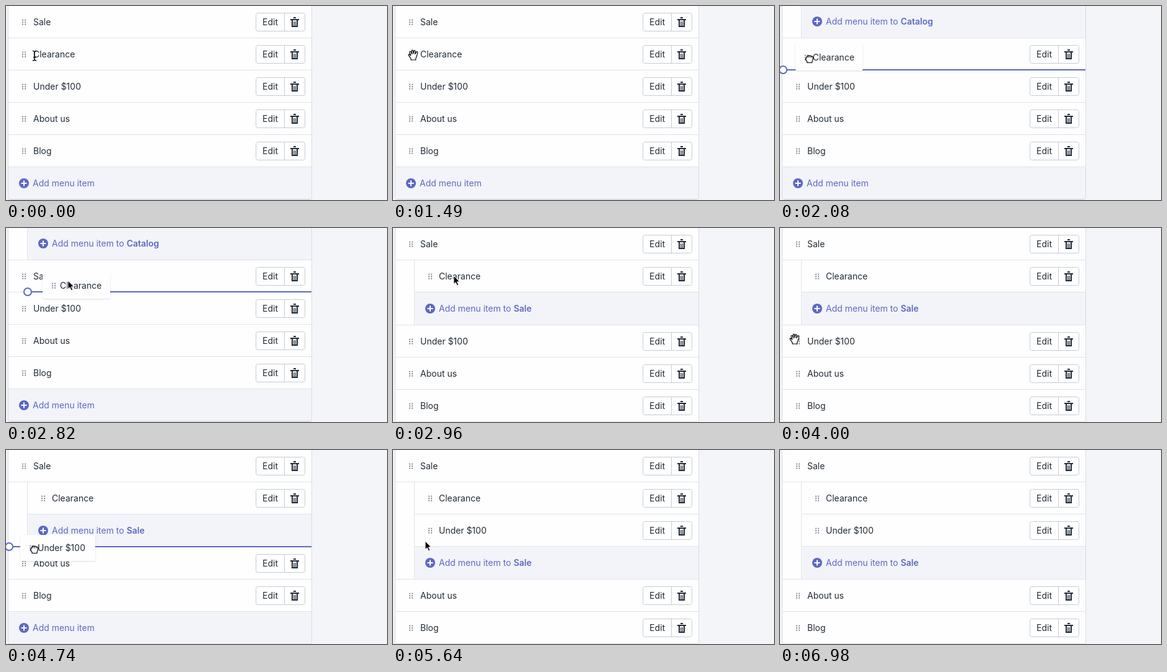
Recreate the animation shown at these times as an HTML page. Size 615 px wide and 313 px high, loop 7.65 s.

```html
<!DOCTYPE html>
<html lang="en">
<head>
<meta charset="utf-8">
<title>Menu editor</title>
<style>
html, body { margin: 0; width: 100%; height: 100%; overflow: hidden; background: #f4f5f9; }
svg { display: block; }
text { font: 14px Inter, "Liberation Sans", sans-serif; white-space: pre; }
tspan { font-weight: 600; }
</style>
</head>
<body>
<svg id="stage" width="615" height="313" viewBox="0 0 615 313"></svg>
<script>
const LOOP = 7650, STEP = 148;
const INK = '#212b36', ACCENT = '#5c68c4', TINT = '#f3f4f9', BORDER = '#dfe3e8';

// ">" is a nested row, "+" is an add button, nested when it names a parent
const layouts = [
  { top: 0, items: ['Sale', 'Clearance', 'Under $100', 'About us', 'Blog', '+'] },
  { top: -1, items: ['+Catalog', 'Sale', 'Under $100', 'About us', 'Blog', '+'], drag: 'Clearance', width: 66, lineY: 103 },
  { top: 0, items: ['Sale', '>Clearance', '+Sale', 'Under $100', 'About us', 'Blog'] },
  { top: 0, items: ['Sale', '>Clearance', '+Sale', 'About us', 'Blog', '+'], drag: 'Under $100', width: 78, lineY: 156 },
  { top: 0, items: ['Sale', '>Clearance', '>Under $100', '+Sale', 'About us', 'Blog'] }
];

// start, steps, layout, cursor, from x, y, to x, y
const moves = [
  [0, 1, 0, 'beam', 46, 80],
  [140, 1, 0, 'beam', 41, 80],
  [290, 2, 0, 'hand', 31, 80, 33, 79],
  [1640, 8, 1, 'fist', 34, 81, 82, 95],
  [2820, 1, 1, 'arrow', 100, 85],
  [2960, 1, 2, 'arrow', 98, 77],
  [3560, 1, 2, 'point', 71, 131],
  [3710, 1, 2, 'point', 50, 142],
  [3860, 4, 2, 'hand', 24, 179, 31, 184],
  [4590, 3, 3, 'fist', 33, 176, 59, 144],
  [5340, 1, 3, 'arrow', 58, 144],
  [5490, 2, 4, 'arrow', 55, 146, 52, 147],
  [6080, 3, 4, 'arrow', 370, 252, 368, 301],
  [6530, 3, 4, 'arrow', 508, 252, 531, 297],
  [6980, 1, 4, 'none', 0, 0]
];

const outline = (d, lines = '') =>
  `<path d="${d}" fill="#fff" stroke="#000" stroke-width="1.2" stroke-linejoin="round"/>` +
  `<path d="${lines}" fill="none" stroke="#000"/>`;

const cursors = {
  none: '',
  beam: '<path d="M-3-7.5Q0-7.5 0-5V6Q0 8 3 8M3-7.5Q0-7.5 0-5M0 6Q0 8-3 8M-2 3H2" fill="none" stroke="#000" stroke-width="1.3"/>',
  arrow: '<path d="M0 0V13.5L3.1 10.7 5.5 15.8 7.8 14.8 5.5 9.8H9.6Z" stroke="#fff"/>',
  hand: outline('M-4 8V6C-5 4-8 1-8 0C-8-1.6-6.3-1.4-5 .5L-4.3 1-6-4C-6.3-6-4.2-6.4-3.6-4.6L-2.5-1.5-2.8-6.5C-2.8-8.3-.6-8.3-.5-6.5L-.2-2 .8-6.3C1.2-8 3.2-7.4 3-5.7L2.5-1.5 4.5-4.5C5.4-6 7.2-5 6.6-3.5C6-1 5.4 3 3.8 5.5V8Z'),
  fist: outline('M-4 6.5V4.5C-6 2.5-7 .5-5.8-.8L-4.6-1C-5-4-3.5-5-2.3-4C-1.8-5.5 0-5.4 .5-4.2C1.5-5.2 3-4.8 3.2-3.5C5-4 5.8-3 5.6-1C5.5 2 5 3 4 5V6.5Z', 'M-2.2-3.8V-1.5M.5-4V-1.5M3.2-3.4V-1.5'),
  point: outline('M-3 8V6C-4 4-7 1.5-7 .2C-7-1.4-5.2-1.2-4 .5L-3.5 1V-6.5C-3.5-8.5-1.2-8.5-1.2-6.5V-2.5C0-3.8 1.4-3.4 1.7-2C2.8-3 4-2.6 4.2-1.3C5.4-2 6.4-1.2 6.4 .2C6.4 3 5.8 4.5 4.8 6V8Z', 'M-.5 2V5.5M1.6 2V5.5M3.7 2V5.5')
};

const rect = (x, y, w, h, fill, more = '') =>
  `<rect x="${x}" y="${y}" width="${w}" height="${h}" fill="${fill}" ${more}/>`;
const line = (d, color, width = 1) =>
  `<path d="${d}" fill="none" stroke="${color}" stroke-width="${width}"/>`;
const text = (x, y, s, fill = INK) => `<text x="${x}" y="${y + 5}" fill="${fill}">${s}</text>`;

function grip(x, y) {
  let dots = '';
  for (const dx of [-3, 1])
    for (const dy of [-4.5, -1, 2.5]) dots += rect(x + dx, y + dy, 2.2, 2.2, '#8793a3', 'rx=".8"');
  return dots;
}

const buttons = y =>
  rect(403.5, y - 14.5, 79, 29, '#fff', 'rx="3" stroke="#c4cdd5"') +
  line(`M449.5 ${y - 14}v28`, '#c4cdd5') +
  text(414, y, 'Edit') +
  rect(464, y - 8, 4, 2, INK) +
  line(`M459 ${y - 4}h14M462 ${y - 4}v11h8v-11`, INK, 2) +
  line(`M464.8 ${y - 1}v7M467.2 ${y - 1}v7`, INK, 1.2);

function addButton(x, y, parent, active) {
  const color = active ? '#fff' : ACCENT;
  const label = 'Add menu item' + (parent && ` to <tspan>${parent}</tspan>`);
  return `<circle cx="${x}" cy="${y}" r="8" fill="${color}"/>` +
    line(`M${x - 4.5} ${y}h9M${x} ${y - 4.5}v9`, active ? ACCENT : '#fff', 2) +
    text(x + 14, y, label, color);
}

function list({ top, items }, active) {
  let y = top, out = rect(4, 0, 489, 313, '#fefefe');
  for (const item of items) {
    const add = item[0] === '+', nested = item[0] === '>' || (add && item.length > 1);
    const name = item.replace(/^[+>]/, ''), mid = y + 26;
    const h = add && nested ? 53 : 52, left = nested ? 34 : 4;
    if (add) out += rect(left, y, 493 - left, h - 1, TINT);
    out += line(`M${item[0] === '>' ? 34 : 4} ${y + h - .5}H493`, BORDER);
    if (nested) out += line(`M34.5 ${y}v${h}`, BORDER);
    if (add && nested && active) out += rect(34, y - 1, 459, h, ACCENT, 'rx="2"');
    const x = nested ? 60 : 29;
    out += add ? addButton(x, mid, name, active && nested)
      : grip(x, mid) + text(nested ? 74 : 44, mid, name) + buttons(mid);
    y += h;
  }
  return out + rect(3.5, -9.5, 490, y + 10, 'none', `rx="3" stroke="#d8dce4"`);
}

function ghost({ drag, width, lineY }, x, y) {
  const dot = x > 45 ? 35 : 5;
  return line(`M${dot} ${lineY}H493`, ACCENT, 2) +
    `<circle cx="${dot}" cy="${lineY}" r="6" fill="#fff" stroke="${ACCENT}" stroke-width="2"/>` +
    rect(x - 18, y - 21, width + 43, 42, '#fefefe', 'rx="2" style="filter:drop-shadow(0 1px 1px #0002)"') +
    grip(x, y) + text(x + 10, y, drag);
}

function scene(i, k) {
  const [, steps, id, cursor, x0, y0, x1 = x0, y1 = y0] = moves[i];
  const p = steps > 1 ? k / (steps - 1) : 0;
  const x = x0 + (x1 - x0) * p, y = y0 + (y1 - y0) * p;
  const layout = layouts[id];
  let out = list(layout, cursor === 'point');
  if (layout.drag) {
    // once released, the dragged row rests where the grab ended
    const [gx, gy] = cursor === 'fist' ? [x, y] : moves[i - 1].slice(6);
    out += ghost(layout, gx - 5, gy - 2);
  }
  return out + `<g transform="translate(${x} ${y})">${cursors[cursor]}</g>`;
}

const stage = document.getElementById('stage');
let shown = '';
function tick(now) {
  const t = now % LOOP;
  const i = moves.findLastIndex(m => m[0] <= t);
  const k = Math.min(moves[i][1] - 1, Math.floor((t - moves[i][0]) / STEP));
  const key = i + ':' + k;
  if (key !== shown) {
    stage.innerHTML = scene(i, k);
    shown = key;
  }
  requestAnimationFrame(tick);
}
tick(performance.now());
</script>
</body>
</html>
```
